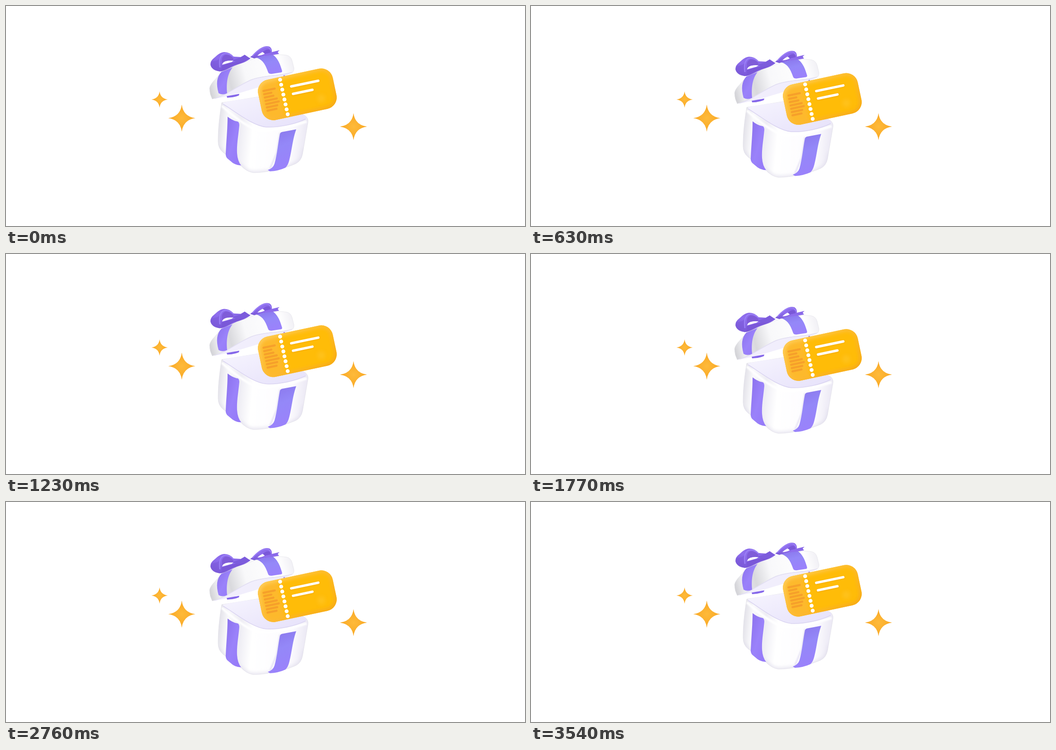
Write an HTML page that moves like this. It is 1150 px wide and 487 px high and loops after 3600 ms.

```html
<!DOCTYPE html>
<html lang="en">
<head>
<meta charset="utf-8">
<title>Gift box</title>
<style>
html, body { margin: 0; width: 100%; height: 100%; overflow: hidden; background: #fff; }
svg { display: block; width: 100%; height: 100%; }
</style>
</head>
<body>
<svg viewBox="0 0 1150 487">
  <defs>
    <linearGradient id="band" x1="0" y1="0" x2="1" y2="1">
      <stop offset="0" stop-color="#8a70ec"/><stop offset=".5" stop-color="#9a82fa"/><stop offset="1" stop-color="#9478f8"/>
    </linearGradient>
    <linearGradient id="blueBand" x1="0" y1="0" x2=".3" y2="1">
      <stop offset="0" stop-color="#8874ea"/><stop offset=".5" stop-color="#9488f8"/><stop offset="1" stop-color="#9a82fb"/>
    </linearGradient>
    <linearGradient id="loop" x1="0" y1="1" x2="1" y2="0">
      <stop offset="0" stop-color="#7655d4"/><stop offset=".45" stop-color="#8f6eee"/><stop offset="1" stop-color="#8262e2"/>
    </linearGradient>
    <linearGradient id="lidFill" gradientUnits="userSpaceOnUse" x1="451" y1="185" x2="638" y2="135">
      <stop offset="0" stop-color="#d2d2d6"/><stop offset=".1" stop-color="#ededf0"/>
      <stop offset=".25" stop-color="#d9d9dd"/><stop offset=".44" stop-color="#f8f8fa"/>
      <stop offset=".85" stop-color="#fff"/><stop offset="1" stop-color="#f1f0f5"/>
    </linearGradient>
    <linearGradient id="boxFill" gradientUnits="userSpaceOnUse" x1="470" y1="285" x2="668" y2="305">
      <stop offset="0" stop-color="#e4e3ea"/><stop offset=".09" stop-color="#f9f9fb"/>
      <stop offset=".24" stop-color="#eeedf4"/><stop offset=".38" stop-color="#fff"/>
      <stop offset=".82" stop-color="#fcfbfe"/><stop offset="1" stop-color="#e9e6f3"/>
    </linearGradient>
    <linearGradient id="inside" x1="0" y1="0" x2="1" y2="1">
      <stop offset="0" stop-color="#f6f4fe"/><stop offset="1" stop-color="#e6e1fa"/>
    </linearGradient>
    <linearGradient id="rim" x1="0" y1="0" x2="1" y2="1">
      <stop offset="0" stop-color="#ffd263"/><stop offset=".5" stop-color="#fdbb34"/><stop offset="1" stop-color="#f5a51a"/>
    </linearGradient>
    <radialGradient id="starFill">
      <stop offset="0" stop-color="#feba3a"/><stop offset="1" stop-color="#f9a825"/>
    </radialGradient>
    <filter id="soft" x="-30%" y="-30%" width="160%" height="160%"><feGaussianBlur stdDeviation="4"/></filter>
    <filter id="faint" x="-30%" y="-30%" width="160%" height="160%"><feGaussianBlur stdDeviation="1.5"/></filter>
    <path id="star" d="M0-30Q3.5-3.5 30 0Q3.5 3.5 0 30Q-3.5 3.5-30 0Q-3.5-3.5 0-30Z" fill="url(#starFill)"/>
    <path id="boxShape" d="M478 214C472 250 470 275 470 300Q470 315 481 324L519 352Q533 367 548 369C575 369 615 361 642 349Q654 343 657 328L669 258Q671 247 660 241L560 201Z"/>
    <rect id="card" x="-84.5" y="-45.5" width="169" height="91" rx="26"/>
    <clipPath id="boxClip"><use href="#boxShape"/></clipPath>
    <clipPath id="cardClip"><use href="#card"/></clipPath>
  </defs>

  <use href="#star" transform="translate(340.3 207) scale(.6)"/>
  <use href="#star" transform="translate(389.5 248.3)"/>
  <use href="#star" transform="translate(770 267)"/>

  <g id="gift">
    <!-- lid -->
    <path d="M457 206C490 202 540 186 575 175Q610 160 637 146L560 150L490 180Z" fill="#f1eefc"/>
    <path d="M457 206Q451 195 451 182Q452 174 463 163L477 147Q484 139 500 134L552 116C580 109 605 106 622 109Q631 111 634 121L638 137Q639 146 632 148C605 155 570 153 543 163C515 175 490 198 457 206Z" fill="url(#lidFill)" stroke="#e3e3e8" stroke-width=".7"/>
    <path d="M462 205C492 196 517 174 545 163C572 153 605 155 634 147" fill="none" stroke="#e2def3" stroke-width="1.5"/>
    <path d="M489 199.5L517 194.5L516 198Q504 203 490 203Z" fill="#8668ea"/>
    <path d="M477 146C467 157 465 172 471 193Q480 198 490 193C488 172 490 151 502 136Z" fill="url(#band)"/>
    <path d="M553 114C569 118 575 130 581 147Q583 151 590 150L610 147Q613 146 611 141C606 124 600 113 590 107Z" fill="url(#blueBand)"/>
    <path d="M614 154L618 153L617 156Z" fill="#8668ea"/>

    <!-- bow -->
    <path fill-rule="evenodd" fill="url(#loop)" d="M453 129Q453 121 461 115C470 107 476 102 484 102Q496 102 504 112L520 113L529 108L534 113L542 116C534 122 526 126 515 129C500 134 489 143 474 145Q454 141 453 129ZM479 130Q480 124 487 122Q496 120 504 121L500 124Z"/>
    <path d="M455 123Q471 122 477 113Q472 132 479 143Q459 148 453 130Z" fill="#7a58d8" opacity=".5"/>
    <path d="M479 127Q476 112 486 108Q496 107 504 116L502 121Q487 119 479 127Z" fill="#7f5cd8"/>
    <path d="M474 136C471 117 476 105 487 105Q496 105 504 113" fill="none" stroke="#9b80f6" stroke-width="2.5"/>
    <path d="M478 132Q494 126 511 123L540 116Q524 127 504 132L477 145Z" fill="#7a58d8"/>
    <path d="M501 120L520 114L529 108L541 116L526 123L510 124Z" fill="#7c5cdc"/>
    <path fill-rule="evenodd" fill="url(#loop)" d="M541 113C549 108 556 98 565 93Q575 87 584 90Q590 94 589 102L606 98L602 102L605 106L588 109C572 110 559 113 550 116ZM557 110Q565 110 573 106Q572 102 568 102Q562 105 557 110Z"/>
    <path d="M569 102Q577 94 585 97L586 103L574 106Z" fill="#7a58d8"/>
    <path d="M546 111Q561 93 576 91Q585 91 587 99" fill="none" stroke="#9a7ef6" stroke-width="2.5"/>

    <!-- box -->
    <use href="#boxShape" fill="url(#boxFill)" stroke="#e1e0e7" stroke-width=".8"/>
    <g clip-path="url(#boxClip)">
      <path d="M470 310Q472 322 520 355Q535 370 550 370Q610 368 650 346Q659 338 662 315" fill="none" stroke="#dedbea" stroke-width="6" filter="url(#soft)"/>
      <path d="M478 221C500 241 530 266 558 275Q585 280 666 256" fill="none" stroke="#fff" stroke-width="5" filter="url(#faint)"/>
      <path d="M607 280L600 325L585 360" fill="none" stroke="#e4e0f3" stroke-width="3" filter="url(#faint)"/>
    </g>
    <path d="M481 214Q510 207 560 202L650 237Q670 244 664 250C640 262 605 269 577 268C548 266 510 235 481 217Z" fill="url(#inside)"/>
    <path d="M481 217C510 235 548 266 577 268C605 269 640 262 664 250" fill="none" stroke="#d9d3f1" stroke-width="1.5"/>
    <path d="M491 245Q502 254 514 256Q517 258 517 264C515 286 511 306 512 326Q513 343 521 353Q511 353 502 347L490 337Q486 332 487 325C488 299 491 272 491 245Z" fill="url(#band)"/>
    <path d="M611 279Q627 276 643 273C635 295 634 316 628 340Q625 353 619 358Q604 365 585 366L580 363Q592 359 595 349C601 328 603 302 607 283Q608 280 611 279Z" fill="url(#blueBand)"/>

    <!-- ticket -->
    <g transform="translate(645.5 195.5) rotate(-12)">
      <use href="#card" fill="#ffbc08"/>
      <g clip-path="url(#cardClip)">
        <path d="M-90-46H-36V50H-90Z" fill="#fdb83c" opacity=".7" filter="url(#soft)"/>
        <use href="#card" fill="none" stroke="url(#rim)" stroke-width="10" filter="url(#soft)"/>
        <circle cx="50" cy="20" r="9" fill="#ffc629" opacity=".6" filter="url(#soft)"/>
      </g>
    </g>
    <path id="bars" fill="none" stroke="#f6a02a" stroke-width="4.6" stroke-linecap="round"/>
    <g fill="none" stroke-linecap="round">
      <path d="M632 179L692 166M636 196L679 187" stroke="#e99508" stroke-width="6" opacity=".4" filter="url(#faint)"/>
      <path d="M632 178L692 165.5M636 194.5L679 185.5" stroke="#fff" stroke-width="5.4"/>
      <path id="holes" stroke="#fff" stroke-width="8.6"/>
    </g>
  </g>
</svg>
<script>
const $ = id => document.getElementById(id);

$('bars').setAttribute('d', [25, 16, 19, 25, 28, 23, 20].map((w, i) =>
  `M${570.5 + i * 1.5} ${188 + i * 7.3}l${w} ${-w * 0.21}`).join(''));
$('holes').setAttribute('d', Array.from({ length: 8 }, (_, i) =>
  `M${607.4 + i * 2.4} ${163.3 + i * 10.9}h.01`).join(''));

const LOOP = 3600, STEP = 60, TRAVEL = 28;

// Drops for half the loop and rises for the other half, at a steady pace in small steps
function draw(now) {
  const t = now % LOOP;
  const n = t < LOOP / 2 ? Math.floor(t / STEP + 0.5) : 60 - Math.floor(t / STEP);
  $('gift').setAttribute('transform', `translate(0 ${(n * TRAVEL / 30).toFixed(2)})`);
}

const start = performance.now();
function tick() {
  draw(performance.now() - start);
  requestAnimationFrame(tick);
}
tick();
</script>
</body>
</html>
```
